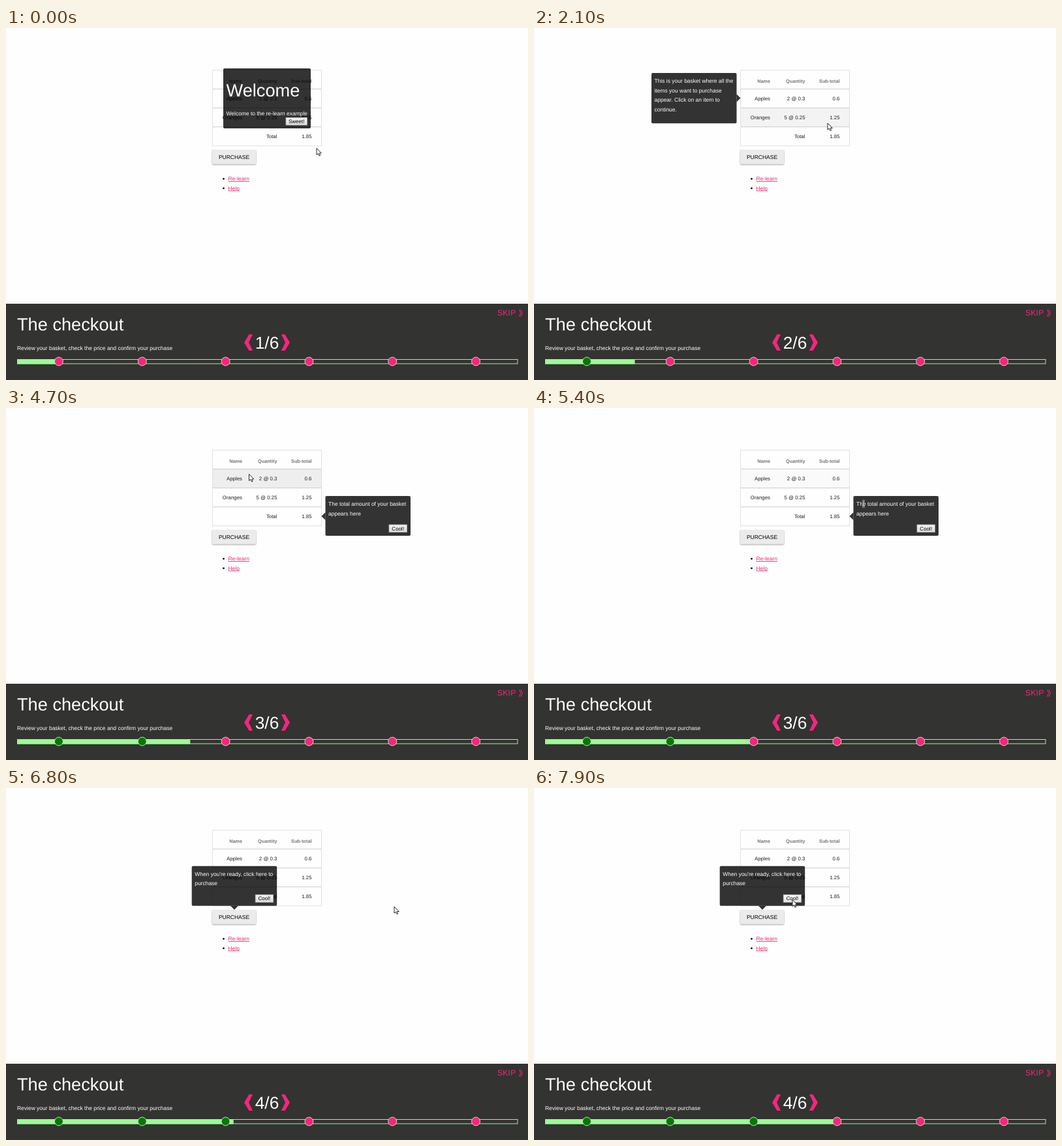
An HTML page for the animation above (8 s loop, 800 px wide and 540 px high).

```html
<!DOCTYPE html>
<html lang="en">
<head>
<meta charset="utf-8">
<title>Checkout tour</title>
<style>
  html, body { margin: 0; width: 100%; height: 100%; overflow: hidden; background: #fefefe; }
  svg { display: block; width: 800px; height: 540px; }
  text { font: 8.47px "Liberation Sans", Arial, sans-serif; text-rendering: geometricPrecision; white-space: pre; }
  .cell { font-size: 7.87px; fill: #212121; text-anchor: end; }
  .head { font-size: 7.26px; font-weight: bold; fill: #757575; }
  .big { font-size: 27.2px; }
  .mid { text-anchor: middle; }
  .light { fill: #fff; }
  .pink { fill: #f6257f; }
  .link { fill: #ee267b; text-decoration: underline; }
  .label { font-size: 8.07px; text-anchor: middle; }
  .shade { fill: rgba(0, 0, 0, .8); }
</style>
</head>
<body>
<svg id="stage" viewBox="0 0 800 540"></svg>
<script>
const LOOP = 8000, TICK = 100;
const ROW_TOPS = { apples: 94, oranges: 123, total: 152 };
const BAR_LEFT = 17, BAR_WIDTH = 767, STEPS = 6;

// When each tour step appears, and when its bar movement begins.
const stepTimes = [
  { show: 0, start: -1000 },
  { show: 2100, start: 2000 },
  { show: 4700, start: 4600 },
  { show: 6800, start: 6770 }
];
const hovers = [
  ['total', 750, 950],
  ['oranges', 2000, 3200],
  ['apples', 3200, 5270],
  ['total', 7400, 7620]
];
const buttonHovers = { 0: [1000, 2100], 2: [6100, 6800], 3: [7800, 8000] };
const pointerPath = [
  [0, 476, 184.5], [600, 476, 184.5], [1100, 450, 146], [2800, 450, 146],
  [3500, 372.5, 101.5], [4800, 372.5, 101.5], [5200, 465, 118], [5300, 488, 133],
  [5400, 505, 147], [5500, 536, 159], [6200, 595, 182], [6900, 595, 182],
  [7400, 474, 167], [7900, 396, 171.5]
];

const clamp = v => Math.max(0, Math.min(1, v));
const text = (x, y, value, cls = '') => `<text x="${x}" y="${y}" class="${cls}">${value}</text>`;
const box = (x, y, w, h, attrs) => `<rect x="${x}" y="${y}" width="${w}" height="${h}" ${attrs}/>`;
const dotX = i => BAR_LEFT + BAR_WIDTH * (i + .5) / STEPS;

// The CSS "ease" curve, solved by bisection.
function ease(x) {
  x = clamp(x);
  let lo = 0, hi = 1, u = .5;
  for (let i = 0; i < 16; i++) {
    u = (lo + hi) / 2;
    const bx = .75 * u * (1 - u) + u ** 3;
    if (bx < x) lo = u; else hi = u;
  }
  return x === 0 || x === 1 ? x : .3 * u * (1 - u) ** 2 + 3 * u * u * (1 - u) + u ** 3;
}

function tableRow(y, cells, cls = '') {
  return cells.map((value, i) => text([362, 415.5, 468.5][i], y, value, 'cell ' + cls)).join('');
}

function button(x, y, w, label) {
  return box(x + .5, y + .5, w - 1, 11.5, 'class="button" fill="url(#face)" stroke="#a9a9a9" stroke-width=".8"') +
    text(x + w / 2, y + 9, label, 'label');
}

function bubble(x, y, h, lines, arrow, extra = '') {
  const copy = lines.map((line, i) => text(4.5, 15 + i * 14.52, line, 'light')).join('');
  return `<g class="popup" transform="translate(${x} ${y})">` +
    box(0, 0, 130.5, h, 'rx="2" class="shade"') +
    `<path class="shade" d="${arrow}"/>${copy}${extra}</g>`;
}

function table() {
  const fills = Object.entries(ROW_TOPS)
    .map(([id, y]) => box(317, y, 166, 29, `id="${id}" fill="#eee"`)).join('');
  const lines = Object.values(ROW_TOPS)
    .map(y => `<path d="M317 ${y - .3}H483" stroke="#ccc"/>`).join('');
  return fills + lines +
    box(316.5, 64.8, 167, 116, 'fill="none" stroke="#e0e0e0"') +
    tableRow(84, ['Name', 'Quantity', 'Sub-total'], 'head') +
    tableRow(110.5, ['Apples', '2 @ 0.3', '0.6']) +
    tableRow(139.5, ['Oranges', '5 @ 0.25', '1.25']) +
    tableRow(168.5, ['', 'Total', '1.85']);
}

function page() {
  return table() +
    box(316, 187, 67, 21.5, 'rx="1.2" fill="#ebebeb" filter="url(#lift)"') +
    text(349.5, 201.2, 'PURCHASE', 'mid') +
    '<circle cx="333.5" cy="231.3" r="1.4"/><circle cx="333.5" cy="245.8" r="1.4"/>' +
    text(340.5, 234, 'Re-learn', 'link') + text(340.5, 248.5, 'Help', 'link');
}

function popups() {
  const cool = button(97, 43.5, 28.5, 'Cool!');
  return '<g class="popup">' + box(333, 62, 134, 92, 'rx="2" class="shade"') +
    text(337.5, 105, 'Welcome', 'big light') +
    text(337.5, 134, 'Welcome to the re-learn example', 'light') +
    button(428.5, 137, 33.5, 'Sweet!') + '</g>' +
    bubble(180, 69, 77.3, ['This is your basket where all the', 'items you want to purchase',
      'appear. Click on an item to', 'continue.'], 'M130.5 32.5l6 6l-6 6z') +
    bubble(489.5, 135, 61, ['The total amount of your basket', 'appears here'], 'M0 25l-6 6l6 6z', cool) +
    bubble(284.7, 119.8, 61, ["When you're ready, click here to", 'purchase'], 'M59.3 61l6 6l6 -6z', cool);
}

function panel() {
  const chevron = 'M372.5 470H378L372 482.5L378 495H372.5L365 482.5Z';
  const dots = Array.from({ length: STEPS }, (_, i) =>
    `<circle class="dot" cx="${dotX(i)}" cy="511.5" r="6.5" stroke="#c8f5bd" stroke-width=".9"/>`).join('');
  return box(0, 423, 800, 117, 'fill="#333331"') +
    text(17, 464, 'The checkout', 'big light') +
    text(17, 494, 'Review your basket, check the price and confirm your purchase', 'light') +
    `<path class="pink" d="${chevron}"/>` +
    `<path class="pink" d="${chevron}" transform="matrix(-1 0 0 1 800 0)"/>` +
    '<text id="counter" class="mid light" x="400" y="491.5" style="font-size:26.3px"></text>' +
    '<text class="pink" x="753" y="441.3" style="font-size:12.1px;letter-spacing:.24px">SKIP</text>' +
    '<path d="M786.5 431.8l2.4 5.6l-2.4 5.6M789 431.8l2.4 5.6l-2.4 5.6" fill="none" stroke="#f6257f"/>' +
    box(17.5, 508.5, 766.5, 6.5, 'fill="none" stroke="#96fb8f"') +
    box(17, 508, 0, 7.5, 'id="bar" fill="#98ff92"') + dots;
}

const stage = document.getElementById('stage');
stage.innerHTML = `
  <defs>
    <linearGradient id="face" x2="0" y2="1"><stop stop-color="#f4f4f4"/><stop offset="1" stop-color="#dcdcdc"/></linearGradient>
    <linearGradient id="faceHover" x2="0" y2="1"><stop stop-color="#fafafa"/><stop offset="1" stop-color="#e4e4e4"/></linearGradient>
    <filter id="lift" x="-10%" y="-20%" width="120%" height="150%">
      <feDropShadow dx="0" dy="1.2" stdDeviation=".8" flood-opacity=".38"/>
    </filter>
  </defs>` + page() + popups() + panel() + `
  <path id="arrow" d="M0 0V10L2.4 8L4 11.6L5.7 10.9L4.2 7.5H7.3Z" fill="#fff" stroke="#111" stroke-width=".9"/>
  <g id="beam" fill="none"><path d="M-2-4.5H2M0-4.5V4.5M-2 4.5H2" stroke="#fff" stroke-width="2"/>
    <path d="M-2-4.5H2M0-4.5V4.5M-2 4.5H2" stroke="#222" stroke-width=".8"/></g>`;

const $ = id => document.getElementById(id);
const popupNodes = [...stage.querySelectorAll('.popup')];
const dotNodes = [...stage.querySelectorAll('.dot')];

function pointerAt(t) {
  const next = pointerPath.findIndex(p => p[0] > t);
  if (next < 0) return pointerPath.at(-1).slice(1);
  const [t0, x0, y0] = pointerPath[next - 1], [t1, x1, y1] = pointerPath[next];
  const k = (t - t0) / (t1 - t0), s = k * k * (3 - 2 * k);
  return [x0 + (x1 - x0) * s, y0 + (y1 - y0) * s];
}

function draw(t) {
  const step = stepTimes.filter(s => s.show <= t).length - 1;
  popupNodes.forEach((node, i) => {
    node.style.display = i === step ? '' : 'none';
    const [on, off] = buttonHovers[i] || [0, 0];
    const face = node.querySelector('.button');
    if (face) face.setAttribute('fill', t >= on && t < off ? 'url(#faceHover)' : 'url(#face)');
  });
  dotNodes.forEach((node, i) => node.setAttribute('fill', i < step ? '#007a00' : '#f6257f'));
  $('counter').textContent = `${step + 1}/${STEPS}`;

  const progress = step ? step - 1 + ease((t - stepTimes[step].start) / 300) : 0;
  $('bar').setAttribute('width', dotX(progress) - BAR_LEFT);

  for (const id in ROW_TOPS) {
    const level = hovers.filter(h => h[0] === id)
      .map(([, on, off]) => ease((t - on) / 280) * (1 - ease((t - off) / 280)));
    $(id).setAttribute('opacity', Math.max(...level));
  }

  const [x, y] = pointerAt(t), typing = t >= 5400 && t < 5800;
  $('arrow').style.display = typing ? 'none' : '';
  $('beam').style.display = typing ? '' : 'none';
  for (const id of ['arrow', 'beam']) $(id).setAttribute('transform', `translate(${x} ${y})`);
}

const begin = performance.now();
function frame() {
  const t = (performance.now() - begin) % LOOP;
  draw(Math.floor(t / TICK) * TICK);
  requestAnimationFrame(frame);
}
frame();
</script>
</body>
</html>
```
